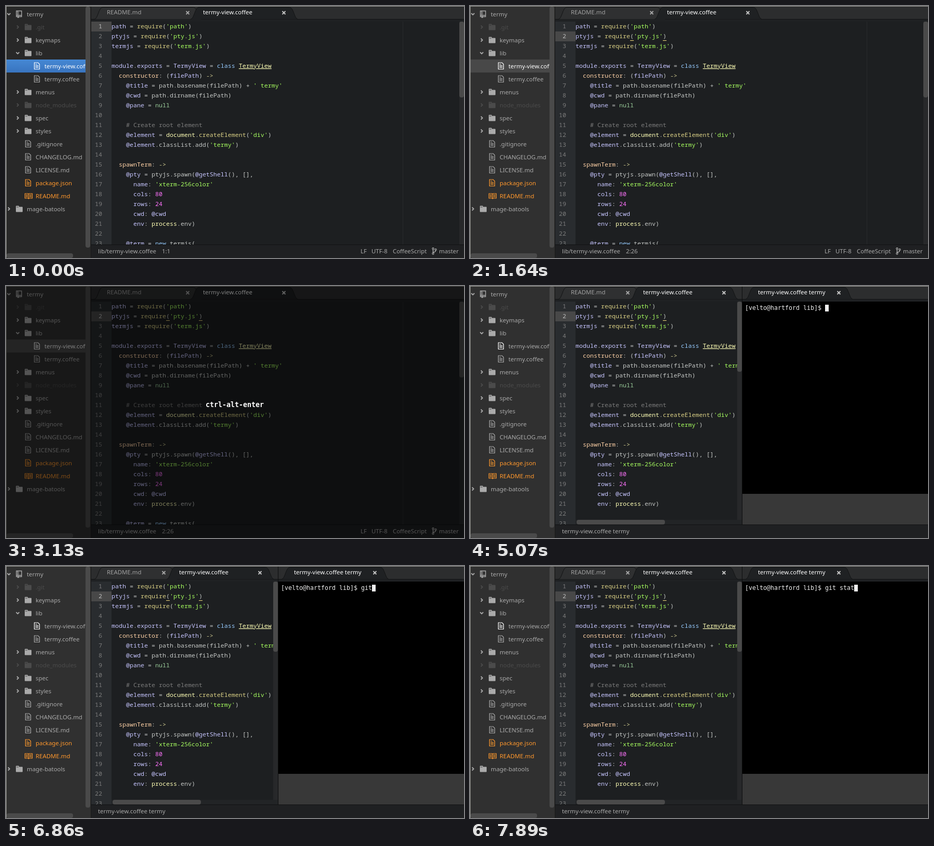
Animation of 881x485 px, one loop 8 s. Source, as an HTML page:

```html
<!DOCTYPE html>
<html lang="en">
<head>
<meta charset="utf-8">
<title>Editor with terminal pane</title>
<style>
html, body { margin: 0; width: 100%; height: 100%; overflow: hidden; background: #1d1f21; }
svg { display: block; width: 881px; height: 485px; }
text { white-space: pre; font: 11.4px "Noto Sans", "Open Sans", sans-serif; fill: #aaa; }
.code text { font: 11.67px "Noto Sans Mono", "DejaVu Sans Mono", monospace; fill: #c5c8c6; }
.code text.num { fill: #7c7c7c; text-anchor: end; }
.code text.cur { fill: #bdbdbd; }
.term { font: 11.63px "DejaVu Sans Mono", "Liberation Mono", monospace; fill: #f0f0f0; }
.keys { font: bold 13.29px "DejaVu Sans Mono", "Liberation Mono", monospace; fill: #fff; }
.str { fill: #a8ff60; }
.note { fill: #7c7c7c; }
.digit { fill: #ff73fd; }
.key { fill: #96cbfe; }
.fn { fill: #ffd2a7; }
.call { fill: #dad085; }
.nil { fill: #99cc99; }
.arrow { fill: #cfcb90; }
.obj { fill: #ffffb6; }
.type { fill: #ffffb6; text-decoration: underline; }
.name { fill: #c6c5fe; }
</style>
</head>
<body>
<svg id="stage" viewBox="0 0 881 485" xmlns="http://www.w3.org/2000/svg"></svg>
<script>
const LOOP = 8000, ROW = 25, LINE = 19, CELL = 7;
const GREY = '#aaa', DIM = '#4b4b4b', ORANGE = '#ff982d';

const source = `path = require('path')
ptyjs = require('pty.js')
termjs = require('term.js')

module.exports = TermyView = class TermyView
  constructor: (filePath) ->
    @title = path.basename(filePath) + ' termy'
    @cwd = path.dirname(filePath)
    @pane = null

    # Create root element
    @element = document.createElement('div')
    @element.classList.add('termy')

  spawnTerm: ->
    @pty = ptyjs.spawn(@getShell(), [],
      name: 'xterm-256color'
      cols: 80
      rows: 24
      cwd: @cwd
      env: process.env)

    @term = new termjs(`.split('\n');

const rules = {
  str: "'[^']*'",
  note: '#.*',
  digit: '\\b\\d+\\b',
  key: '\\b(?:class|new)\\b',
  fn: 'constructor|spawnTerm',
  call: 'require|createElement',
  nil: '\\bnull\\b',
  arrow: '->',
  obj: 'document|process',
  type: 'TermyView$',
  name: '@\\w+|module|filePath(?=\\) ->)|\\w+(?=:| =)'
};
const lexer = new RegExp(Object.entries(rules).map(([k, r]) => `(?<${k}>${r})`).join('|'), 'g');

function paint(line) {
  return line.replace(lexer, (word, ...rest) => {
    const groups = rest.at(-1);
    const kind = Object.keys(groups).find(k => groups[k] !== undefined);
    return `<tspan class="${kind}">${word}</tspan>`;
  });
}

const rect = (x, y, w, h, fill, extra = '') =>
  `<rect x="${x}" y="${y}" width="${w}" height="${h}" fill="${fill}" ${extra}/>`;
const text = (x, y, s, extra = '') => `<text x="${x}" y="${y}" ${extra}>${s}</text>`;
const stroke = (d, color, w = 1, extra = '') =>
  `<path d="${d}" fill="none" stroke="${color}" stroke-width="${w}" ${extra}/>`;
const tint = color => `style="fill:${color}"`;
const thumb = (x, y, w, h) => rect(x, y, w, h, '#4a4a4a', 'rx="4"');

// Sidebar icons, drawn around the middle of a row
const icons = {
  folder: (x, y, c) =>
    `<path d="M${x} ${y - 5}q0-1 1-1h4q1 0 1 1v1h6q1 0 1 1v8q0 1-1 1h-11q-1 0-1-1z" fill="${c}"/>` +
    stroke(`M${x + 1} ${y - 3.5}h4`, '#303030', 0.8),
  file: (x, y, c) =>
    stroke(`M${x + 1.5} ${y - 6.5}h7l3 3v9.5h-10z`, c, 1.2) +
    stroke(`M${x + 3.5} ${y - 3.5}h3m-3 2.5h6m-6 2h6m-6 2h6`, c),
  book: (x, y, c) =>
    stroke(`M${x + .5} ${y - 4.5}h6l1 1 1-1h6v9h-6l-1 1-1-1h-6zM${x + 7.5} ${y - 3.5}v9`, c, 1.2) +
    stroke(`M${x + 2} ${y - 2}h4m-4 2h4m-4 2h4m3-4h4m-4 2h4m-4 2h4`, c),
  repo: (x, y, c) =>
    stroke(`M${x + 1} ${y - 6}h10v11h-10zM${x + 3.5} ${y - 6}v8M${x + 1} ${y + 2.5}h10`, c, 1.4) +
    stroke(`M${x + 5.5} ${y - 4}v5`, c, 1, 'stroke-dasharray="1 1"') +
    `<path d="M${x + 3} ${y + 4}h3v4l-1.5-1.5-1.5 1.5z" fill="${c}"/>`
};

function chevron(x, y, open, c) {
  const d = open ? `M${x - 3} ${y - 1.5}l3 3 3-3` : `M${x - 1.5} ${y - 3}l3 3-3 3`;
  return stroke(d, c, 1.8);
}

// label, icon, depth, chevron (0 none, 1 closed, 2 open), colour
const tree = [
  ['termy', 'repo', 0, 2], ['.git', 'folder', 1, 1, DIM], ['keymaps', 'folder', 1, 1],
  ['lib', 'folder', 1, 2], ['termy-view.coffee', 'file', 2, 0, '#fff'], ['termy.coffee', 'file', 2, 0],
  ['menus', 'folder', 1, 1], ['node_modules', 'folder', 1, 1, DIM], ['spec', 'folder', 1, 1],
  ['styles', 'folder', 1, 1], ['.gitignore', 'file', 1, 0], ['CHANGELOG.md', 'file', 1, 0],
  ['LICENSE.md', 'file', 1, 0], ['package.json', 'file', 1, 0, ORANGE],
  ['README.md', 'book', 1, 0, ORANGE], ['mage-batools', 'folder', 0, 1]
];

function treeRow([label, icon, depth, arrow, color = GREY], i) {
  const y = 15.5 + ROW * i, x = 40 + 17 * depth;
  const mark = arrow ? chevron(x - 34.5, y, arrow === 2, color) : '';
  return mark + icons[icon](x - 21, y, color) +
    text(x, y + 4.5, label, `${tint(color)} ${i === 4 ? 'id="picked"' : ''}`);
}

function tab(x, close, label, active) {
  const l = x - 24, r = close + 27;
  const edge = `M${l} 25.5C${l + 7} 25 ${l + 8} 2.5 ${l + 16} 2.5H${r - 16}C${r - 8} 2.5 ${r - 7} 25 ${r} 25.5`;
  return `<path d="${edge}" fill="${active ? '#1f2123' : '#2f3031'}" stroke="#121314"/>` +
    text(x, 16, label, tint(active ? '#fff' : '#a0a0a0')) +
    stroke(`M${close - 3} 10l6 6m0-6l-6 6`, active ? '#c8c8c8' : '#a8a8a8', 1.8);
}

function tabBar(x, w, tabs) {
  return rect(x, 1, w, 29, '#2c2d2e') + rect(x, 25, w, 1, '#121314') +
    tabs.map(t => tab(...t)).join('') + rect(x, 26, w, 4, '#1f2123');
}

const codeLines = source.map((line, i) => {
  const y = 43 + LINE * i;
  return text(185, y, i + 1, `class="num" id="num${i}"`) +
    `<g clip-path="url(#view)">${text(203, y, paint(line))}</g>`;
}).join('');

const branch = stroke('M821.5 468v7M826.5 470v1q0 2-5 3.5', '#b5b5b5', 1.4) +
  [[821.5, 467], [821.5, 476.5], [826.5, 469]].map(([x, y]) =>
    `<circle cx="${x}" cy="${y}" r="1.6" fill="#1f2022" stroke="#b5b5b5" stroke-width="1.1"/>`).join('');

document.getElementById('stage').innerHTML = `
<defs>
  <clipPath id="view"><rect id="viewBox" x="203" y="30" width="669" height="429"/></clipPath>
  <clipPath id="pane"><rect x="164" y="30" width="717" height="429"/></clipPath>
  <clipPath id="side"><rect width="153" height="476"/></clipPath>
  <linearGradient id="blue" x2="0" y2="1">
    <stop stop-color="#4588d4"/><stop offset="1" stop-color="#3974bf"/>
  </linearGradient>
</defs>
${rect(0, 0, 881, 485, '#1d1f21')}
${rect(164, 30, 39, 429, '#292c2f')}
${rect(164, 30, 39, LINE, '#484848', 'id="mark"')}
<g class="code" clip-path="url(#pane)">${codeLines}</g>
<g id="brackets">${rect(308, 66, 7, 1, '#f8de7e')}${rect(371, 66, 7, 1, '#f8de7e')}</g>
${rect(203, 30, 1, LINE, '#fff', 'id="caret"')}
${rect(164, 459, 717, 26, '#1f2022')}${rect(164, 459, 717, 1, '#111213')}
<g id="wide">
  ${rect(763, 30, 1, 429, '#292b2d')}
  ${rect(872, 30, 9, 429, '#27282a')}${thumb(872, 30, 9, 146)}
  ${tabBar(164, 717, [[194, 349.5, 'README.md', false], [379, 534.5, 'termy-view.coffee', true]])}
  ${text(177, 476, 'lib/termy-view.coffee')}${text(300, 476, '1:1', 'id="place"')}
  ${text(682, 476, 'LF')}${text(703, 476, 'UTF-8')}${text(744, 476, 'CoffeeScript')}
  ${branch}${text(833, 476, 'master')}
</g>
<g id="split">
  ${rect(203, 450, 320, 9, '#222426')}${thumb(205, 450, 170, 9)}
  ${rect(514, 30, 9, 420, '#27282a')}${thumb(514, 30, 9, 135)}
  ${tabBar(164, 359, [[194, 303.5, 'README.md', false], [333, 488.5, 'termy-view.coffee', true]])}
  ${rect(524, 30, 357, 370, '#000')}${rect(524, 400, 357, 59, '#383838')}
  ${tabBar(524, 357, [[554, 709.5, 'termy-view.coffee termy', true]])}
  ${rect(523, 1, 1, 458, '#0c0d0e')}
  ${text(529, 46, '', 'class="term" id="shell"')}
  ${rect(683, 36, CELL, 13, '#f0f0f0', 'id="block"')}
  ${text(177, 476, 'termy-view.coffee termy')}
</g>
${rect(0, 0, 163, 485, '#303030', 'id="panel"')}${rect(163, 0, 1, 485, '#191919')}
${rect(1, 103, 152, ROW, '#484848', 'id="chosen"')}
<g clip-path="url(#side)">${tree.map(treeRow).join('')}</g>
${thumb(153, 1, 9, 464)}${thumb(1, 476, 128, 9)}
${rect(0, 0, 881, 1, '#9d9d98')}${rect(0, 0, 1, 485, '#9d9d98')}
<g id="hint">
  ${rect(0, 0, 881, 485, '#000', 'opacity=".5"')}
  ${text(384, 233, 'ctrl-alt-enter', 'class="keys"')}
</g>`;

const $ = id => document.getElementById(id);
const show = (id, on) => $(id).setAttribute('visibility', on ? 'visible' : 'hidden');
const at = (steps, t) => steps.findLast(s => s[0] <= t);

const prompt = '[velto@hartford lib]$ ', command = 'git stat';
// time, caret on
const blink = [[0, 0], [150, 1], [600, 0], [1040, 1], [1640, 0], [2090, 1], [2530, 0]];
// time, letters typed, block on
const typing = [
  [0, 0, 0], [5070, 0, 1], [5520, 0, 0], [6120, 0, 1], [6420, 1, 1], [6560, 2, 1], [6860, 3, 1],
  [7010, 4, 0], [7160, 4, 1], [7310, 5, 1], [7450, 6, 1], [7600, 7, 1], [7890, 8, 1]
];

function draw(t) {
  const focused = t < 150, moved = t >= 1190, split = t >= 5070;
  const [, caretOn] = at(blink, t);
  const [, typed, blockOn] = at(typing, t);

  show('wide', !split);
  show('split', split);
  show('hint', t >= 3130 && !split);
  $('viewBox').setAttribute('width', split ? 311 : 669);

  $('panel').setAttribute('fill', focused ? '#282828' : '#303030');
  $('chosen').setAttribute('fill', focused ? 'url(#blue)' : '#484848');
  show('chosen', !split);
  $('picked').style.fill = split ? GREY : '#fff';

  $('mark').setAttribute('y', moved ? 49 : 30);
  $('num0').classList.toggle('cur', !moved);
  $('num1').classList.toggle('cur', moved);
  $('place').textContent = moved ? '2:26' : '1:1';
  show('brackets', moved);
  show('caret', caretOn && !split);
  $('caret').setAttribute('x', moved ? 203 + 25 * CELL : 203);
  $('caret').setAttribute('y', moved ? 49 : 30);

  $('shell').textContent = prompt + command.slice(0, typed);
  $('block').setAttribute('x', 529 + CELL * (prompt.length + typed));
  show('block', blockOn && split);
}

const start = performance.now();
function tick() {
  draw((performance.now() - start) % LOOP);
  requestAnimationFrame(tick);
}
tick();
</script>
</body>
</html>
```
